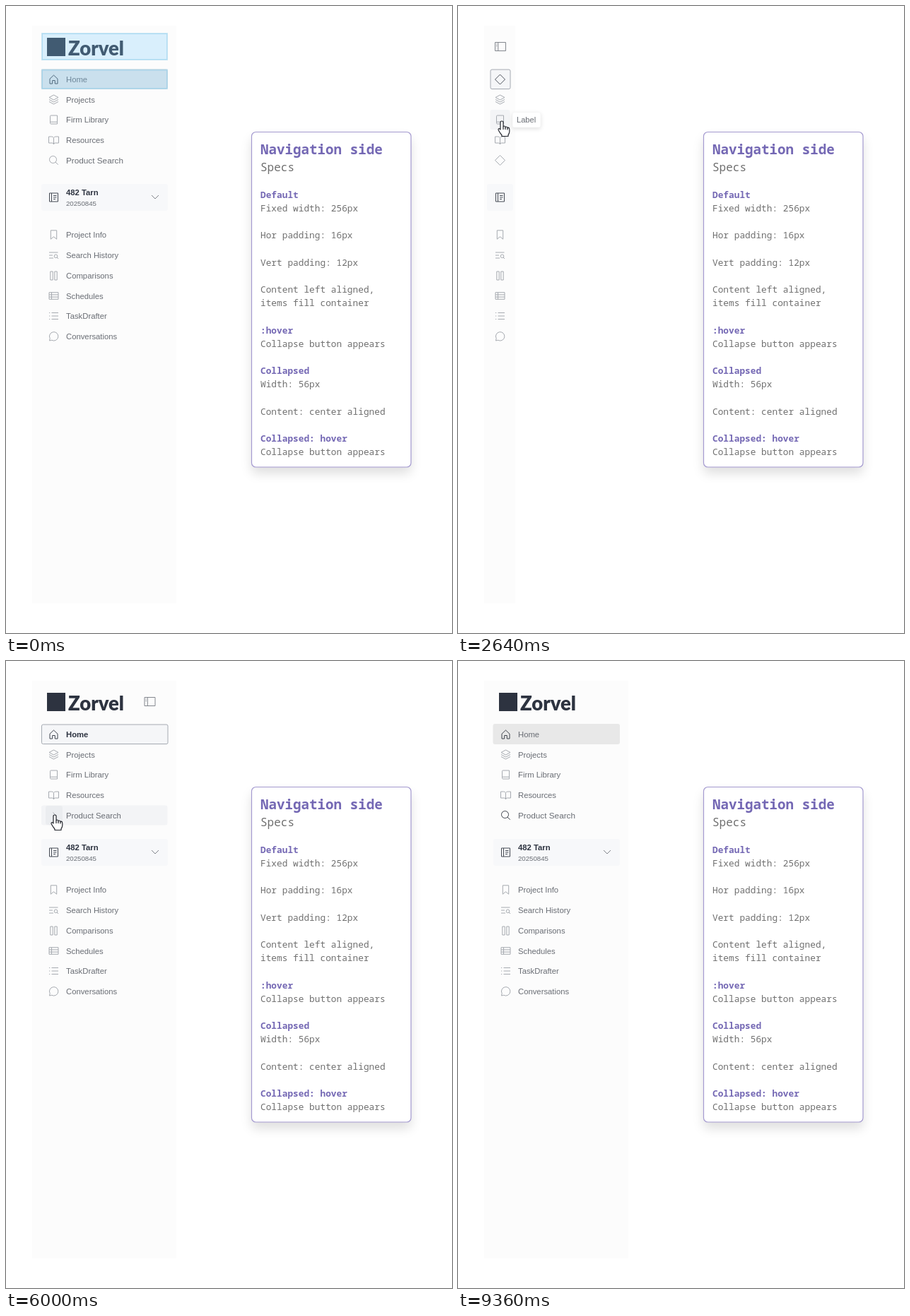
These frames come from a looping animation (631 by 888 pixels, 9540 ms). An HTML page with a canvas:

```html
<!DOCTYPE html>
<html lang="en">
<head>
<meta charset="utf-8">
<title>Navigation side</title>
<style>
html, body { margin: 0; width: 100%; height: 100%; overflow: hidden; background: #fff; }
canvas { display: block; width: 631px; height: 888px; }
</style>
</head>
<body>
<canvas id="stage"></canvas>
<script>
const W = 631, H = 888, LOOP = 9540;
const canvas = document.getElementById('stage');
const ratio = window.devicePixelRatio || 1;
canvas.width = W * ratio;
canvas.height = H * ratio;
const ctx = canvas.getContext('2d');

const SANS = '"Liberation Sans", Arial, sans-serif';
const MONO = '"Noto Sans Mono", "DejaVu Sans Mono", monospace';
const DARK = '#2d3340', TEXT = '#696d74', LIGHT = '#a6aab0', PURPLE = '#7468b4';

const ICONS = {
  home: 'M-5.5-.8L0-6L5.5-.8V6H1.8V1.5H-1.8V6H-5.5Z',
  layers: 'M0-6.5L6.5-3L0 .5L-6.5-3ZM-6.5 0L0 3.5L6.5 0M-6.5 3L0 6.5L6.5 3',
  book: 'M-5 4.5V-4.8Q-5-6-3.8-6H5V3.2H-3.8Q-5 3.2-5 4.6Q-5 6-3.8 6H5V3.2',
  open: 'M0-3.5Q-1-5-3-5H-7V4H-2Q0 4 0 6Q0 4 2 4H7V-5H3Q1-5 0-3.5V6',
  search: 'M4-1A5 5 0 1 1-6-1A5 5 0 1 1 4-1ZM2.7 2.7L6.2 6.2',
  ledger: 'M-6-6H6V6H-6ZM-3-6V6M-.5-2.5H4M-.5 0H4M-.5 2.5H2.5',
  bookmark: 'M-4.2-6.2H4.2V6.2L0 2.8L-4.2 6.2Z',
  history: 'M-6.5-4H6M-6.5 0H-1.5M-6.5 4H-.5M5.3 1.3A2.3 2.3 0 1 1 .7 1.3A2.3 2.3 0 1 1 5.3 1.3M4.6 3L6.6 5',
  columns: 'M-4.7-6H-1.3V6H-4.7ZM1.3-6H4.7V6H1.3Z',
  table: 'M-6.5-4.8H6.5V4.8H-6.5ZM-6.5-1.6H6.5M-6.5 1.6H6.5M-3-4.8V4.8',
  list: 'M-3-4.5H6.5M-3 0H6.5M-3 4.5H6.5M-6.5-4.5H-5.3M-6.5 0H-5.3M-6.5 4.5H-5.3',
  chat: 'M-6 6L-5.3 2.8A6.2 6.2 0 1 1-2.8 5.3Z',
  diamond: 'M0-7L7 0L0 7L-7 0Z',
  toggle: 'M-7.5-6H7.5V6H-7.5ZM-3.2-6V6M-6-3.5H-4.7M-6-1H-4.7',
  down: 'M-5-2.5L0 2.5L5-2.5',
  up: 'M-5 2.5L0-2.5L5 2.5',
  nub: 'M-1.5-3.5L2 0L0 2'
};
const shapes = Object.fromEntries(Object.entries(ICONS).map(([k, d]) => [k, new Path2D(d)]));
const hand = new Path2D('M-2 1Q-2-1 0-1Q2-1 2 1V7Q2 6 3.5 6Q5 6 5 8Q5.2 7 6.5 7Q8 7 8 9Q8.3 8.2 9.3 8.2Q10.8 8.5 10.8 11V14Q10.5 17 9 18.5V20.5H0V19Q-2.5 16-4.7 12Q-5.4 10.5-4.4 9.8Q-3.3 9.3-2 11Z');
const knuckles = new Path2D('M2 7V11M5 8V11M8 9V11.5');
const arrow = new Path2D('M0 0V15.2L3.6 12L6 17.6L8.4 16.5L6 11.1H10.8Z');

const ITEMS = [
  ['home', 'Home', 104], ['layers', 'Projects', 132.5], ['book', 'Firm Library', 161],
  ['open', 'Resources', 190], ['search', 'Product Search', 218.5],
  ['bookmark', 'Project Info', 324], ['history', 'Search History', 353],
  ['columns', 'Comparisons', 382], ['table', 'Schedules', 410.5],
  ['list', 'TaskDrafter', 439], ['chat', 'Conversations', 468]
];
// line slot, text, heading?
const SPECS = [
  [0, 'Default', 1], [1, 'Fixed width: 256px'], [3, 'Hor padding: 16px'],
  [5, 'Vert padding: 12px'], [7, 'Content left aligned,'], [8, 'items fill container'],
  [10, ':hover', 1], [11, 'Collapse button appears'], [13, 'Collapsed', 1],
  [14, 'Width: 56px'], [16, 'Content: center aligned'],
  [18, 'Collapsed: hover', 1], [19, 'Collapse button appears']
];
// pointer path: time, x, y
const PATH = [
  [640, 587, 597], [900, 420, 480], [1200, 154, 315], [1290, 154, 315], [1570, 190, 125],
  [1790, 203, 58], [2150, 203, 58], [2500, 62, 164], [3070, 62, 164], [3280, 60, 58],
  [3420, 60, 58], [3640, 111, 61], [3930, 111, 61], [4150, 282, 240], [4430, 130, 440],
  [4690, 69, 219], [6360, 69, 219], [6560, 188, 277], [7210, 188, 277], [7570, 150, 362],
  [8790, 150, 362], [9080, 225, 190], [9350, 338, 21]
];

const clamp = v => Math.max(0, Math.min(1, v));
const ramp = (t, a, b) => clamp((t - a) / (b - a));
const ease = v => v * v * (3 - 2 * v);
const mix = (a, b, p) => a + (b - a) * p;

function pointerAt(t) {
  const i = PATH.findIndex(k => k[0] > t);
  if (i < 1) return null;
  const [a, b] = [PATH[i - 1], PATH[i]], p = ramp(t, a[0], b[0]);
  return { x: mix(a[1], b[1], p), y: mix(a[2], b[2], p) };
}

function text(s, x, y, size, color = TEXT, weight = 400, family = SANS) {
  ctx.font = `${weight} ${size}px ${family}`;
  ctx.fillStyle = color;
  ctx.fillText(s, x, y);
}

function box(x, y, w, h, r, fill, stroke, line = 1) {
  ctx.beginPath();
  ctx.roundRect(x, y, w, h, r);
  if (fill) { ctx.fillStyle = fill; ctx.fill(); }
  if (stroke) { ctx.strokeStyle = stroke; ctx.lineWidth = line; ctx.stroke(); }
}

function card(x, y, w, h, r, stroke, line, blur = 16, drop = 9) {
  ctx.save();
  ctx.shadowColor = 'rgba(0,0,0,.13)';
  ctx.shadowBlur = blur * ratio;
  ctx.shadowOffsetY = drop * ratio;
  box(x, y, w, h, r, '#fff');
  ctx.restore();
  box(x, y, w, h, r, '#fff', stroke, line);
}

function icon(name, x, y, color = LIGHT, scale = 1, line = 1) {
  ctx.save();
  ctx.translate(x, y);
  ctx.scale(scale, scale);
  ctx.strokeStyle = color;
  ctx.lineWidth = line / scale;
  ctx.stroke(shapes[name]);
  ctx.restore();
}

function fade(alpha, draw) {
  if (alpha <= 0) return;
  ctx.save();
  ctx.globalAlpha *= alpha;
  draw();
  ctx.restore();
}

function drawSpecs() {
  card(347.5, 178.5, 225.5, 474.5, 6, '#a49ad0', 1.2);
  text('Navigation side', 360, 210, 19.2, PURPLE, 700, MONO);
  text('Specs', 360, 233.5, 16, '#707070', 400, MONO);
  for (const [n, s, head] of SPECS)
    text(s, 360, 271.8 + n * 19.17, 12.8, head ? PURPLE : '#707070', head ? 700 : 400, MONO);
}

function drawSidebar(s) {
  const { fold, inside, hover, t } = s;
  const ix = mix(67.5, 59.5, fold), labels = clamp(1 - fold * 1.6);
  const left = mix(50.5, 46, fold), width = mix(178.5, 28, fold);
  box(37, 28, mix(204, 44, fold), 818, 0, '#fcfcfc');

  fade(labels, () => {
    ctx.fillStyle = DARK;
    ctx.fillRect(58, 45, 26, 26);
    text('Zorvel', 88, 70, 27.5, DARK, 900, 'Lato, sans-serif');
  });
  if (inside) icon('toggle', mix(203.5, 60, fold), 57.5, '#83878e');

  if (inside) box(left, 90, width, 27.5, 2, '#f5f6f8', '#a5aab2');
  else box(49.5, 89, 179.5, 29, 3, '#e8e8e8');

  const sy = mix(50, 41, fold), sw = mix(179, 37, fold);
  box(sy, 252, sw, 38, 3, '#f7f8fa');
  icon('ledger', ix, 271, '#454a54');
  fade(labels, () => {
    text('482 Tarn', 85, 268, 11.3, DARK, 700);
    text('20250845', 85, 282.5, 9.67);
    icon(s.popup > .5 ? 'up' : 'down', 211, 270.5, '#7f838a');
  });

  ITEMS.forEach(([name, label, y], i) => {
    const over = hover === i, home = i === 0, search = name === 'search';
    if (over) box(left - .5, y - 14, width, 28, 3, '#f3f4f6');
    const color = home || (search && t >= 1000 && fold < .5) ? '#3d424c' : LIGHT;
    if (search && over && fold === 0) {
      box(56, 205, 24, 27, 3, '#ebedf0');
      icon('nub', 68, 218, LIGHT);
    } else if (home || search) {
      fade(1 - fold, () => icon(name, ix, y, color));
      fade(fold, () => icon('diamond', ix, y, home ? '#4d525c' : LIGHT));
    } else {
      icon(name, ix, y, color);
    }
    const bold = home && inside;
    const size = search && !over ? 11.75 : 11.3;
    fade(labels, () => text(label, 85, y + 4, size, bold ? DARK : TEXT, bold ? 700 : 400));
  });
}

function drawTip() {
  card(77, 150.5, 40, 21.5, 3, '#f3f3f3', .6, 6, 2);
  text('Label', 83, 165, 11.1);
}

function drawPopup(rowHover) {
  card(50.5, 294, 223, 379.5, 4, '#e5e6e8', 1);
  box(63.5, 300, 197.5, 37.5, 5, '#fff', '#8e9197');
  icon('search', 85.5, 318.5, '#898d94', 1.25);
  text('Search', 101, 323, 12.9);
  if (rowHover) box(62, 345, 200, 38, 3, '#f4f5f7');
  for (let i = 0; i < 5; i++) {
    const y = 357.7 + i * 54.4;
    icon('ledger', 85, y + 8, '#92969c', 1.08);
    text('Project ' + (i + 1), 104, y + 4.5, 13, '#41454d');
    text('20250123', 104, y + 21.8, 11.9);
  }
  box(63, 615.5, 197, 1, 0, '#e8e9eb');
  icon('book', 88.5, 646, '#85898f', 1.6);
  text('Firm Library', 111, 650.3, 12.6, '#41454d');
}

function drawSearchPanel(caret) {
  card(57, 207, 161, 346, 4, '#e5e6e8', 1);
  text('Search', 71, 225, 11.3, LIGHT);
  box(57, 235, 161, 1, 0, '#e8e9eb');
  if (caret) box(66.5, 215, 1, 12, 0, DARK);
}

function drawHighlights() {
  for (const [y, h] of [[38.5, 38], [90, 27.5]])
    box(51, y + .5, 177, h - 1, 0, 'rgba(120,203,252,.266)', 'rgba(110,190,228,.4)', 1.8);
}

function drawPointer(p, isHand) {
  ctx.save();
  ctx.translate(p.x, p.y);
  ctx.lineJoin = 'round';
  ctx.fillStyle = '#fff';
  ctx.strokeStyle = '#23262d';
  ctx.lineWidth = 1.2;
  const shape = isHand ? hand : arrow;
  ctx.fill(shape);
  ctx.stroke(shape);
  if (isHand) ctx.stroke(knuckles);
  ctx.restore();
}

function draw(t) {
  const p = pointerAt(t);
  const fold = ease(ramp(t, 2000, 2290)) - ease(ramp(t, 3350, 3630));
  const popup = ramp(t, 6540, 6690) - ramp(t, 7690, 7800);
  const panel = t >= 5000 && t < 6000;
  const inside = !!p && p.x > 37 && p.x < 241;
  const hover = inside && popup <= 0 && !panel
    ? ITEMS.findIndex(([, , y], i) => i > 0 && Math.abs(p.y - y) < 14.3) : -1;

  ctx.setTransform(ratio, 0, 0, ratio, 0, 0);
  ctx.fillStyle = '#fff';
  ctx.fillRect(0, 0, W, H);
  drawSpecs();
  drawSidebar({ t, fold, inside, hover, popup });
  if (fold === 1 && hover === 2) drawTip();
  fade(popup, () => drawPopup(p.y > 345));
  if (panel) drawSearchPanel(t < 5860);
  fade(1 - ramp(t, 70, 290), drawHighlights);
  if (p && !panel) drawPointer(p, inside && t > 1350);
}

function loop(now) {
  draw(now % LOOP);
  requestAnimationFrame(loop);
}
draw(0);
requestAnimationFrame(loop);
</script>
</body>
</html>
```
